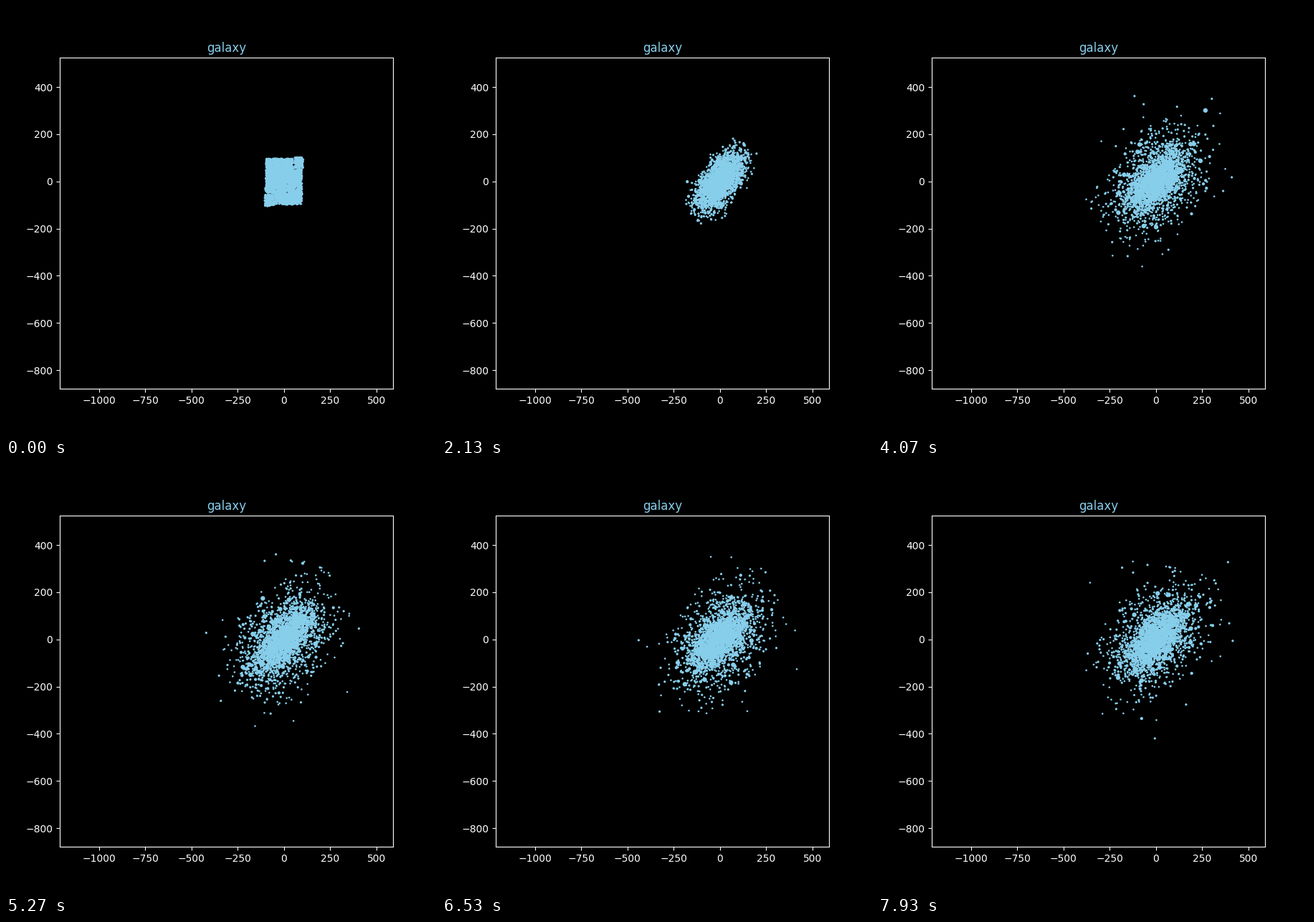
Animation of 600 by 600 pixels, one loop 8 s. Source, as a matplotlib script:

```python
import numpy as np
import matplotlib.pyplot as plt
from matplotlib.animation import FuncAnimation

N = 2800
FRAMES = 120
LOOP = 8000
STAR = "skyblue"
BURST_END = 1.3

rng = np.random.default_rng(12)


def smooth(x):
    x = np.clip(x, 0, 1)
    return x * x * (3 - 2 * x)


def bar(spread, tilt):
    """Gaussian cloud stretched along a tilted axis."""
    g = np.clip(rng.normal(size=(N, 2)), -2.4, 2.4) * spread
    c, s = np.cos(np.radians(tilt)), np.sin(np.radians(tilt))
    return g @ np.array([[c, s], [-s, c]])


def start_square():
    p = rng.uniform(-97, 97, (N, 2))
    p[(p > 50).all(axis=1)] += (7, 6)
    p[(p < -48).all(axis=1)] -= (7, 6)
    return p


def two_fans(core):
    """Early shape: two opposite quarter discs around a dense bar."""
    side = rng.choice([-1, 1], N)
    angle = np.radians(rng.uniform(-10, 100, N))
    radius = 210 * np.sqrt(rng.uniform(0.02, 1, N))
    lobe = rng.random(N) < 0.16
    angle[lobe] = np.radians(rng.choice([-3, 93], lobe.sum()))
    radius[lobe] = rng.normal(185, 20, lobe.sum())
    far = rng.random(N) < 0.05
    radius[far] += rng.uniform(20, 90, far.sum())
    fans = side[:, None] * np.column_stack(
        [radius * np.cos(angle), radius * np.sin(angle)])
    fans += rng.normal(0, 14, (N, 2))
    return np.where(core[:, None], bar((80, 36), 44), fans)


kind = rng.choice(3, N, p=[0.56, 0.41, 0.03])
spread = np.array([(88, 40), (138, 90), (175, 135)])[kind]
core = kind == 0

square = start_square()
fans = two_fans(core)
axis_a, axis_b = bar(spread, 36), bar(spread, 36)
phase = rng.uniform(0, 2 * np.pi, N)
period = np.where(core, rng.uniform(5, 8, N), rng.uniform(2.8, 5.2, N))


def positions(t):
    turn = (phase + 2 * np.pi * t / period)[:, None]
    orbit = axis_a * np.cos(turn) + axis_b * np.sin(turn)
    swing = np.cos(2 * np.pi * (t - BURST_END) / period)
    swing = np.where(core, 1, swing)[:, None]
    burst = np.pi / 2 * np.sin(np.pi / 2 * min(t / BURST_END, 1))
    mix = np.pi / 2 * smooth((t - BURST_END) / 3.5)
    cloud = np.cos(mix) * swing * fans + np.sin(mix) * orbit
    return np.cos(burst) * square + np.sin(burst) * cloud


plt.style.use("dark_background")
fig, ax = plt.subplots(figsize=(6, 6), dpi=100)
ax.set_xlim(-1213, 590)
ax.set_ylim(-879, 525)
ax.set_xticks(range(-1000, 501, 250))
ax.set_yticks(range(-800, 401, 200))
ax.set_title("galaxy", color=STAR)

sizes = rng.choice([3.6, 5.4, 9.5, 21], N, p=[0.58, 0.345, 0.06, 0.015])
stars = ax.scatter(*square.T, s=sizes, c=STAR, linewidths=0)


def update(i):
    stars.set_offsets(positions(i * LOOP / FRAMES / 1000))
    return (stars,)


anim = FuncAnimation(fig, update, frames=FRAMES, interval=LOOP / FRAMES,
                     repeat=True, repeat_delay=0, blit=False)
plt.show()
```
